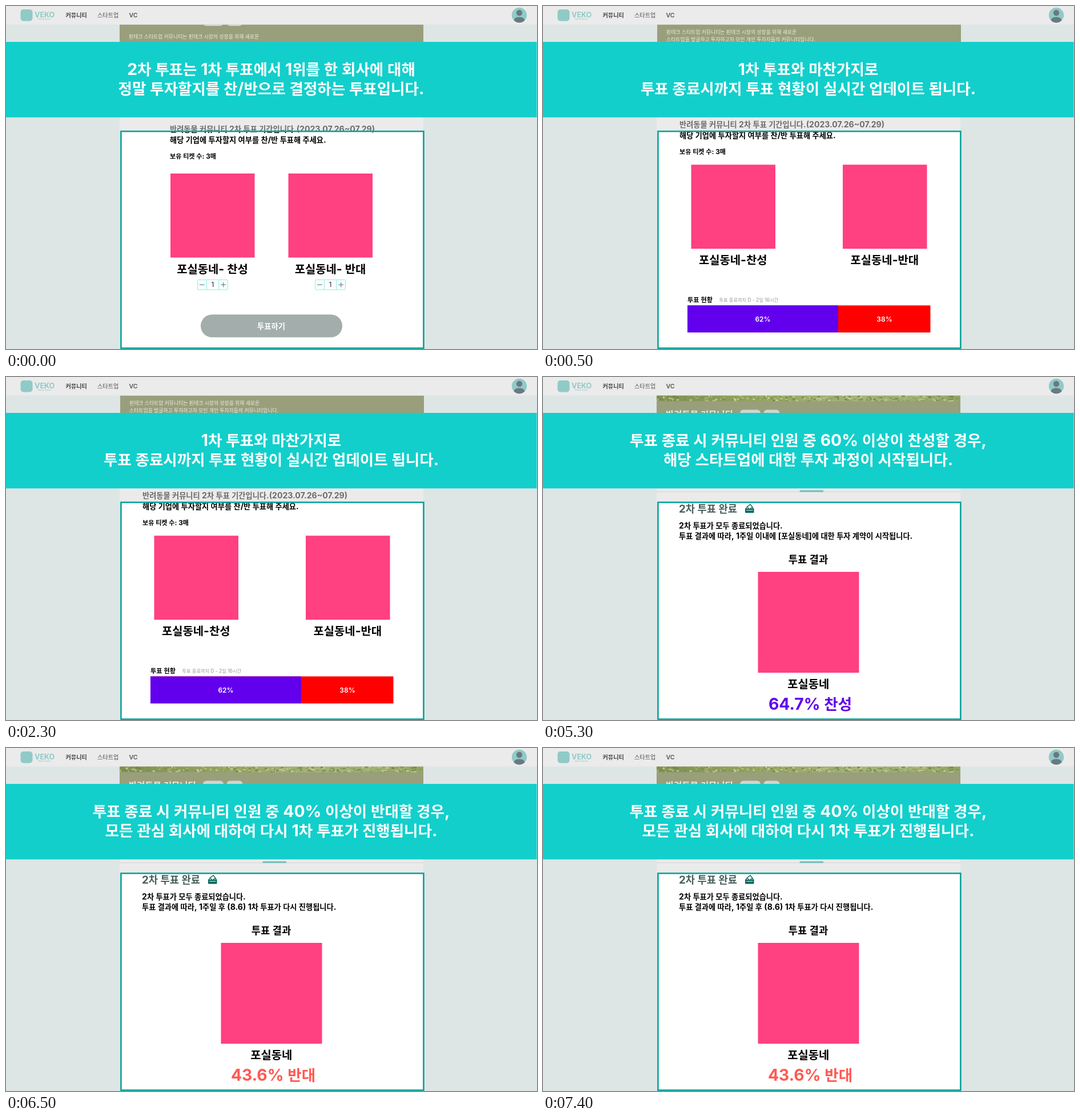
Write an HTML page with a canvas that moves like this. It is 930 px wide and 602 px high and loops after 8000 ms.

```html
<!DOCTYPE html>
<html lang="ko">
<head>
<meta charset="utf-8">
<title>2차 투표 안내</title>
<style>
html, body { margin: 0; width: 100%; height: 100%; overflow: hidden; background: #dee5e5; }
canvas { display: block; }
</style>
</head>
<body>
<canvas id="stage" width="930" height="602"></canvas>
<script>
const ctx = document.getElementById('stage').getContext('2d');
const LOOP = 8000;
const BRAND = '포실동네';
const TEAL = '#12cfcb', PALE_TEAL = '#90cac7', PINK = '#ff4081', OLIVE = '#999f7b';
const BODY = 14.1, LABEL = 21.2, HEAD = 18.8, BANNER = 28.3;

function rect(x, y, w, h, color) {
  ctx.fillStyle = color;
  ctx.fillRect(x, y, w, h);
}

function round(x, y, w, h, r, color) {
  ctx.fillStyle = color;
  ctx.beginPath();
  ctx.roundRect(x, y, w, h, r);
  ctx.fill();
}

function circle(x, y, r, color) {
  ctx.fillStyle = color;
  ctx.beginPath();
  ctx.arc(x, y, r, 0, Math.PI * 2);
  ctx.fill();
}

function clipTo(x, y, w, h, draw) {
  ctx.save();
  ctx.beginPath();
  ctx.rect(x, y, w, h);
  ctx.clip();
  draw();
  ctx.restore();
}

// Hangul is set slightly smaller than Latin; y is the middle of the glyphs.
function text(str, x, y, size, { color = '#000', weight = 700, center = false } = {}) {
  const runs = str.match(/[가-힣]+| +|[^가-힣 ]+/g).map(run => {
    const hangul = /[가-힣]/.test(run);
    const font = hangul
      ? `${weight} ${size * 0.938}px "Noto Sans CJK KR", "Noto Sans CJK", sans-serif`
      : `${weight} ${size}px Inter, sans-serif`;
    ctx.font = font;
    const width = run[0] === ' ' ? run.length * size * 0.24 : ctx.measureText(run).width;
    return { run, font, width };
  });
  if (center) x -= runs.reduce((sum, r) => sum + r.width, 0) / 2;
  ctx.fillStyle = color;
  for (const { run, font, width } of runs) {
    ctx.font = font;
    ctx.fillText(run, x, y + size * 0.36);
    x += width;
  }
}

const centered = (str, x, y, size, color, weight) =>
  text(str, x, y, size, { color, weight, center: true });

// Text is dimmed above the top edge of the highlighted panel.
function dimmedAbovePanel() {
  const g = ctx.createLinearGradient(0, 200, 0, 240);
  g.addColorStop(0, '#6b6b6b');
  g.addColorStop(0.5, '#6b6b6b');
  g.addColorStop(0.5, '#000');
  g.addColorStop(1, '#000');
  return g;
}

function header() {
  rect(0, 0, 930, 32.5, '#ebebeb');
  round(25.5, 6, 21, 20.5, 5, PALE_TEAL);
  text('VEKO', 50, 15, 12.6, { color: PALE_TEAL });
  text('Startup Square', 56, 23, 3.2, { color: PALE_TEAL, weight: 500 });
  text('커뮤니티', 104.5, 16.5, 10.8, { color: '#444' });
  text('스타트업', 160, 16.5, 10.8, { color: '#555', weight: 500 });
  text('VC', 215.5, 16.5, 10.6, { color: '#555', weight: 600 });

  ctx.save();
  ctx.beginPath();
  ctx.arc(899, 16, 13.2, 0, Math.PI * 2);
  ctx.clip();
  rect(880, 0, 40, 32, PALE_TEAL);
  circle(899, 12, 5.2, '#6a7982');
  round(889, 19.5, 20, 16, 8, '#6a7982');
  ctx.restore();
}

function grass() {
  const g = ctx.createLinearGradient(199, 0, 731, 0);
  g.addColorStop(0, '#7f8f52');
  g.addColorStop(0.4, '#98a962');
  g.addColorStop(0.7, '#a5b47a');
  g.addColorStop(1, '#94a664');
  rect(199, 32, 532, 10.5, g);
  let seed = 7;
  const random = () => (seed = seed * 16807 % 2147483647) / 2147483647;
  const tones = ['#74844b', '#b3bf7e', '#c3cd9d', '#859751'];
  clipTo(199, 32, 532, 10.5, () => {
    for (let i = 0; i < 260; i++) {
      const x = 199 + random() * 532, y = 32 + random() * 10;
      rect(x, y, 1 + random() * 5, 1 + random() * 2, tones[Math.floor(random() * 4)]);
    }
  });
}

const pills = (y, h) => {
  round(345, y, 36, h, 6, '#d2d5d1');
  round(386.5, y, 28, h, 6, '#d2d5d1');
};

function banner(lines) {
  rect(0, 63, 929.5, 132.5, TEAL);
  lines.forEach((line, i) => centered(line, 464.5, 111 + i * 34, BANNER, '#fff'));
}

function bigLogos(y, xs, size) {
  xs.forEach(x => rect(x, y, size, size, PINK));
}

function stepper(x) {
  round(x, 480.5, 53, 17.5, 2, '#f4fffe');
  rect(x + 16, 480.5, 21.5, 17.5, '#fff');
  ctx.strokeStyle = '#97e8e4';
  ctx.lineWidth = 1;
  ctx.beginPath();
  ctx.roundRect(x, 480.5, 53, 17.5, 2);
  for (const dx of [16, 37]) {
    ctx.moveTo(x + dx, 480.5);
    ctx.lineTo(x + dx, 498);
  }
  ctx.stroke();
  rect(x + 3.5, 488.7, 8.5, 1, '#666');
  rect(x + 41, 488.7, 8.5, 1, '#666');
  rect(x + 44.75, 485, 1, 8.5, '#666');
  centered('1', x + 26.5, 489.3, 11.5, '#444', 500);
}

function voteText(x, y) {
  text('반려동물 커뮤니티 2차 투표 기간입니다.(2023.07.26~07.29)', x, y, BODY,
    { color: dimmedAbovePanel() });
  text('해당 기업에 투자할지 여부를 찬/반 투표해 주세요.', x, y + 18.7, BODY);
  text('보유 티켓 수: 3매', x, y + 47.7, 11.8);
}

function ballotIcon() {
  const color = '#08665f';
  round(354, 231, 15.5, 7.5, 1, color);
  ctx.strokeStyle = color;
  ctx.lineWidth = 1.4;
  ctx.beginPath();
  ctx.moveTo(354.7, 232);
  ctx.lineTo(357, 228.5);
  ctx.moveTo(368.8, 232);
  ctx.lineTo(366.5, 228.5);
  ctx.stroke();
  ctx.save();
  ctx.translate(362.2, 228);
  ctx.rotate(-0.65);
  ctx.strokeRect(-3.5, -3, 7, 6);
  ctx.restore();
  rect(356, 233.5, 11.5, 1, '#fff');
}

const intro = { color: '#ebebe0', weight: 400 };

function ballotPage() {
  rect(199, 32.5, 532, 31, OLIVE);
  clipTo(199, 32.5, 532, 31, () => pills(18, 17));
  text('핀테크 스타트업 커뮤니티는 핀테크 시장의 성장을 위해 새로운', 215, 53.5, 9.47, intro);
  voteText(287, 216);
  bigLogos(294, [288, 494.5], 147.5);
  centered(BRAND + '- 찬성', 361.5, 461, LABEL);
  centered(BRAND + '- 반대', 568, 461, LABEL);
  stepper(335.5);
  stepper(541.5);
  round(341, 541.5, 248, 40, 20, '#a3adac');
  centered('투표하기', 464.5, 562, 14.2, '#fff');
}

function statusPage() {
  rect(200, 32.5, 532, 31, OLIVE);
  text('핀테크 스타트업 커뮤니티는 핀테크 시장의 성장을 위해 새로운', 216, 45.5, 9.47, intro);
  text('스타트업을 발굴하고 투자하고자 모인 개인 투자자들의 커뮤니티입니다.', 216, 59, 9.47, intro);
  voteText(239, 208.3);
  bigLogos(278.5, [259.5, 525], 147.5);
  centered(BRAND + '-찬성', 332.7, 445, LABEL);
  centered(BRAND + '-반대', 598.3, 445, LABEL);
  text('투표 현황', 253, 515.5, 11.9);
  text('투표 종료까지 D - 2일 16시간', 308.5, 516, 8.8, { color: '#999', weight: 400 });
  rect(253, 525.5, 425.5, 47.5, '#ff0000');
  rect(253, 525.5, 425.5 * 0.62, 47.5, '#6200ee');
  centered('62%', 385, 549.5, 12, '#fff', 600);
  centered('38%', 598, 549.5, 12, '#fff', 600);
}

function resultPage(notice, result, color) {
  rect(199, 32.5, 532, 31, OLIVE);
  grass();
  text('반려동물 커뮤니티', 215, 66, 16.5, { color: '#ebebe5' });
  pills(57.5, 18);
  rect(199, 201, 532, 1, '#d3d5d5');
  round(449.5, 198.8, 41.5, 3.2, 1, '#79c0bb');
  text('2차 투표 완료', 238, 231, HEAD, { color: '#485f5d' });
  ballotIcon();
  text('2차 투표가 모두 종료되었습니다.', 238, 260.5, BODY);
  text(notice, 238, 279, BODY);
  centered('투표 결과', 464.5, 320.5, HEAD, '#000', 600);
  bigLogos(342, [376.5], 177);
  centered(BRAND, 464.7, 538, LABEL);
  centered(result, 468, 574, BANNER, color);
}

const scenes = [
  { start: 0, page: ballotPage,
    lines: ['2차 투표는 1차 투표에서 1위를 한 회사에 대해',
      '정말 투자할지를 찬/반으로 결정하는 투표입니다.'] },
  { start: 500, page: statusPage,
    lines: ['1차 투표와 마찬가지로',
      '투표 종료시까지 투표 현황이 실시간 업데이트 됩니다.'] },
  { start: 3500,
    page: () => resultPage(
      `투표 결과에 따라, 1주일 이내에 [${BRAND}]에 대한 투자 계약이 시작됩니다.`,
      '64.7% 찬성', '#6200ee'),
    lines: ['투표 종료 시 커뮤니티 인원 중 60% 이상이 찬성할 경우,',
      '해당 스타트업에 대한 투자 과정이 시작됩니다.'] },
  { start: 6500,
    page: () => resultPage(
      '투표 결과에 따라, 1주일 후 (8.6) 1차 투표가 다시 진행됩니다.',
      '43.6% 반대', '#ff5a52'),
    lines: ['투표 종료 시 커뮤니티 인원 중 40% 이상이 반대할 경우,',
      '모든 관심 회사에 대하여 다시 1차 투표가 진행됩니다.'] }
];

function draw(now) {
  const time = now % LOOP;
  const scene = scenes.findLast(s => s.start <= time);
  rect(0, 0, 930, 602, '#dee5e5');
  rect(199, 195, 532, 25, '#ebebeb');
  rect(200, 219, 532, 383, '#fff');
  scene.page();
  ctx.strokeStyle = '#08a299';
  ctx.lineWidth = 2.6;
  ctx.strokeRect(201.4, 220, 530, 380.6);
  banner(scene.lines);
  header();
}

const began = performance.now();
function tick() {
  draw(performance.now() - began);
  requestAnimationFrame(tick);
}
tick();
</script>
</body>
</html>
```
